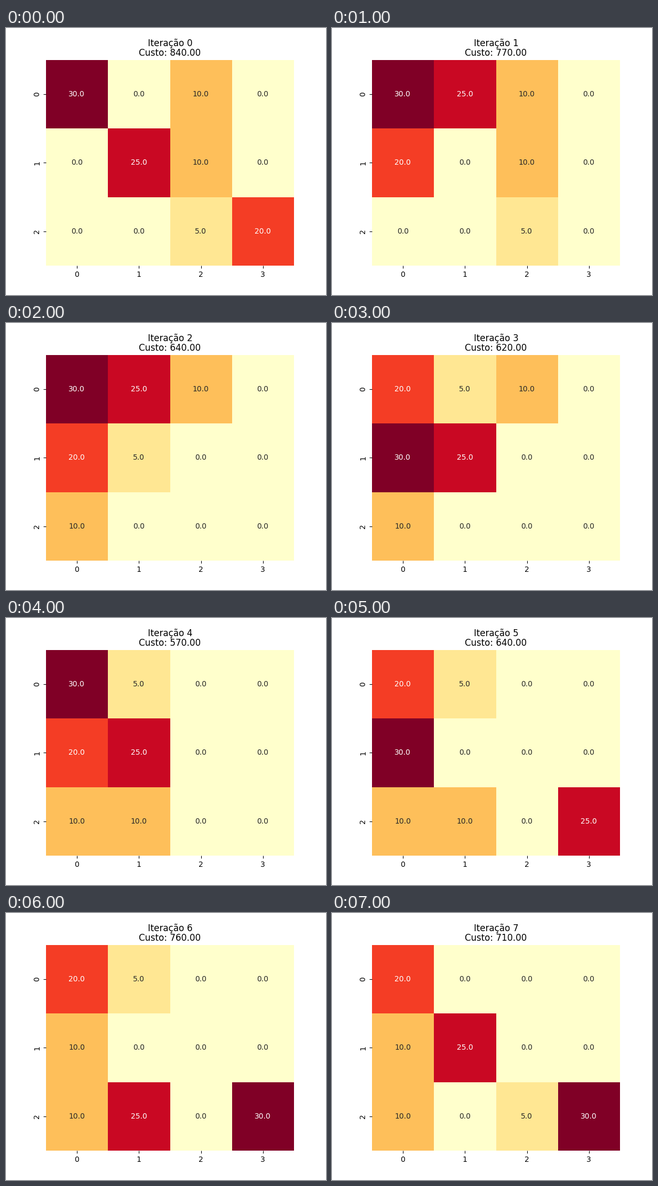
These frames come from a looping animation (600x500 px, 8000 ms). A matplotlib script:

```python
import matplotlib.pyplot as plt
import numpy as np
from matplotlib.animation import FuncAnimation
from matplotlib.transforms import ScaledTranslation

SUPPLY = [40, 35, 25]
DEMAND = [30, 25, 25, 20]
UNIT_COST = np.array([[2, 10, 13, 12],
                      [4, 8, 20, 15],
                      [8, 10, 10, 10]])
ROWS, COLS = UNIT_COST.shape

# Each iteration exchanges cells a-b, then c-d (flat indices).
SWAPS = ["5-1 11-4", "6-8 10-5", "0-4 1-5", "0-4 2-9", "0-4 5-11", "4-11 4-9", "9-5 1-10"]


def cheapest_first():
    """Initial plan: fill the cheapest cells first, the later one on ties."""
    supply, demand = SUPPLY.copy(), DEMAND.copy()
    plan = np.zeros((ROWS, COLS))
    costs = UNIT_COST.ravel()
    for i in sorted(range(costs.size), key=lambda i: (costs[i], -i)):
        r, c = divmod(i, COLS)
        plan[r, c] = min(supply[r], demand[c])
        supply[r] -= plan[r, c]
        demand[c] -= plan[r, c]
    return plan


def plan_at(step):
    """Allocation after the given number of iterations."""
    plan = cheapest_first()
    for pair in " ".join(SWAPS[:step]).split():
        a, b = map(int, pair.split("-"))
        plan.flat[[a, b]] = plan.flat[[b, a]]
    return plan


def text_color(rgb):
    """Dark text on light cells, white text on dark ones."""
    rgb = np.array(rgb)
    linear = np.where(rgb <= 0.03928, rgb / 12.92, ((rgb + 0.055) / 1.055) ** 2.4)
    return "0.15" if linear @ [0.2126, 0.7152, 0.0722] > 0.408 else "white"


def nudge(text, dx, dy):
    """Shift a text by a fraction of a pixel (dy upwards)."""
    shift = ScaledTranslation(dx / fig.dpi, dy / fig.dpi, fig.dpi_scale_trans)
    text.set_transform(text.get_transform() + shift)


plt.rcParams["font.family"] = "DejaVu Sans"
fig, ax = plt.subplots(figsize=(6, 5), dpi=100)
mesh = ax.pcolormesh(plan_at(0), cmap="YlOrRd", vmin=0, vmax=30)
ax.set(xlim=(0, COLS), ylim=(ROWS, 0))
ax.spines[:].set_visible(False)
ax.set_xticks(np.arange(COLS) + 0.5, range(COLS))
ax.set_yticks(np.arange(ROWS) + 0.5, range(ROWS), rotation="vertical")

labels = [ax.text(c + 0.5, r + 0.5, "", ha="center", va="center")
          for r in range(ROWS) for c in range(COLS)]
title = ax.set_title("", linespacing=1.0)

for text in [*labels, *ax.get_xticklabels()]:
    nudge(text, -0.4, 0)
for text in ax.get_yticklabels():
    nudge(text, 0, -1)


def update(step):
    plan = plan_at(step)
    mesh.set_array(plan)
    for label, value in zip(labels, plan.flat):
        label.set_text(f"{value:.1f}")
        label.set_color(text_color(mesh.cmap(mesh.norm(value))[:3]))
    title.set_text(f"Iteração {step}\nCusto: {(plan * UNIT_COST).sum():.2f}")
    return [mesh, title, *labels]


anim = FuncAnimation(fig, update, frames=len(SWAPS) + 1, interval=1000,
                     repeat=True, repeat_delay=0, blit=False)
plt.show()
```
